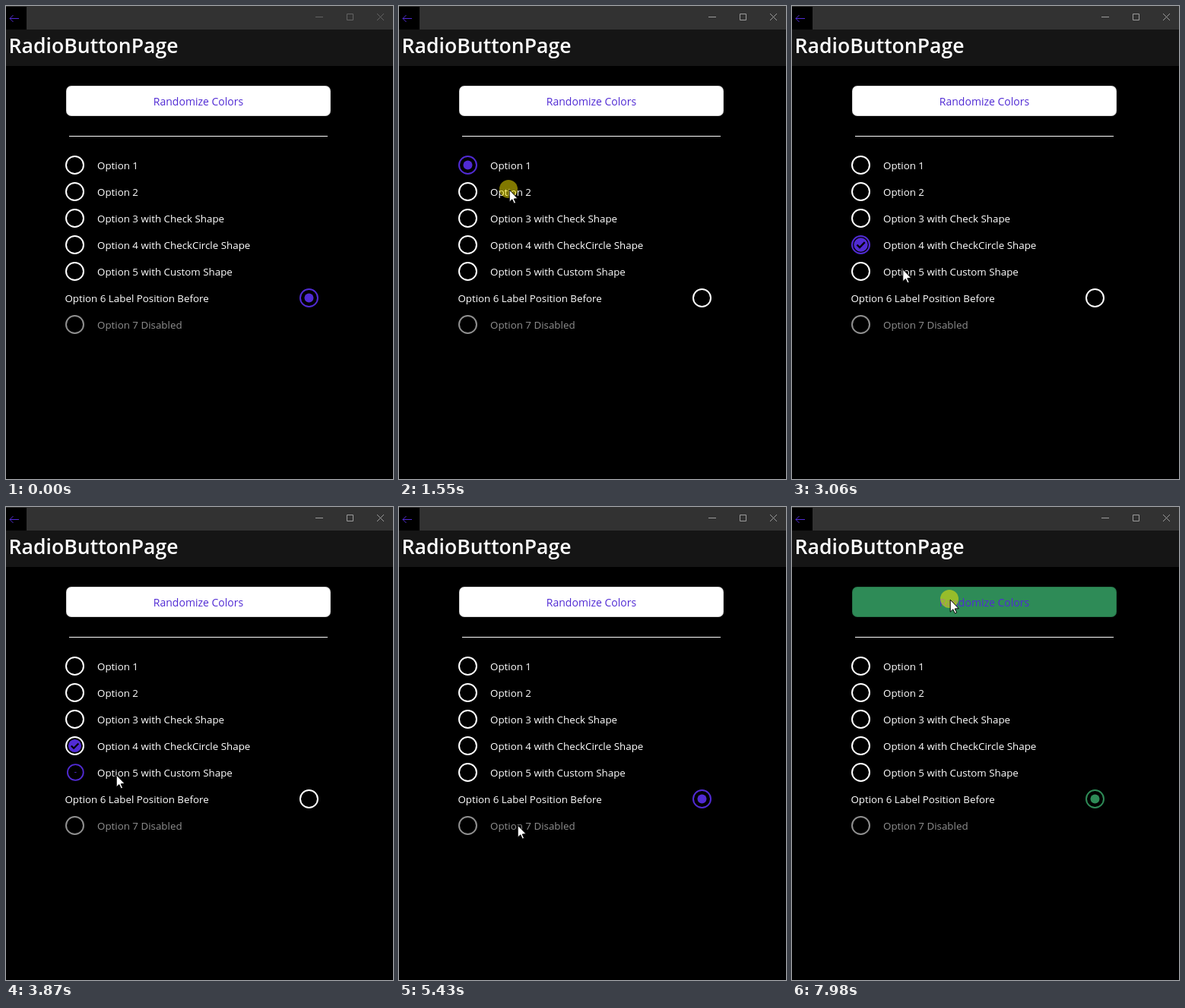
These frames come from a looping animation (509x623 px, 8000 ms). An HTML page with a canvas:

```html
<!DOCTYPE html>
<html lang="en">
<head>
<meta charset="utf-8">
<title>RadioButtonPage</title>
<style>
  html, body { margin: 0; height: 100%; overflow: hidden; background: #000; }
  canvas { display: block; }
</style>
</head>
<body>
<canvas id="stage" width="509" height="623"></canvas>
<script>
const ctx = document.getElementById('stage').getContext('2d');
const LOOP = 8000, HOLD = 100, SETTLE = 50, GROW = 160;
const SANS = '"Open Sans", "Noto Sans", sans-serif';
const PURPLE = '#512bd4', GREEN = '#2e8b57', WHITE = '#fff';

const labels = [
  'Option 1', 'Option 2', 'Option 3 with Check Shape',
  'Option 4 with CheckCircle Shape', 'Option 5 with Custom Shape',
  'Option 6 Label Position Before', 'Option 7 Disabled'
];
const BEFORE = 5, DISABLED = 6, BUTTON = 7;

// Pointer visits, one per option, then the button twice
const entry = { x: 433, y: 571 };
const stops = [
  { arrive: 600, press: 940, x: 144, y: 209 },
  { arrive: 1400, press: 1540, x: 144, y: 241 },
  { arrive: 2060, press: 2080, x: 145, y: 275 },
  { arrive: 2450, press: 2580, x: 149, y: 312 },
  { arrive: 3130, press: 3690, x: 144, y: 350 },
  { arrive: 4150, press: 4610, x: 144, y: 384 },
  { arrive: 5290, press: 5500, x: 155, y: 418 },
  { arrive: 6780, press: 7235, x: 207, y: 121 },
  { arrive: 7300, press: 7975, x: 207, y: 121 }
];

const ramp = (t, start, length) => Math.min(1, Math.max(0, (t - start) / length));
const ease = u => u * u * (3 - 2 * u);
const actsAt = i => stops[i].press + HOLD + SETTLE;

function pointerAt(t) {
  let { x, y } = entry, from = entry;
  for (const to of stops) {
    const travel = 300 + 0.7 * Math.hypot(to.x - from.x, to.y - from.y);
    const u = ease(ramp(t, to.arrive - travel, travel));
    x += (to.x - x) * u;
    y += (to.y - y) * u;
    from = to;
  }
  return [x, y];
}

function box(x, y, w, h, color) {
  ctx.fillStyle = color;
  ctx.fillRect(x, y, w, h);
}

function text(str, x, y, font, color, align = 'left') {
  ctx.font = `${font} ${SANS}`;
  ctx.textAlign = align;
  ctx.fillStyle = color;
  ctx.fillText(str, x, y);
}

function stroke(shape, color, width = 1) {
  ctx.strokeStyle = color;
  ctx.lineWidth = width;
  ctx.stroke(new Path2D(shape));
}

function disc(x, y, r, color) {
  ctx.beginPath();
  ctx.arc(x, y, r, 0, 7);
  ctx.fillStyle = color;
  ctx.fill();
}

function mark(i, color) {
  if (i === 2) stroke('M-5.7 0 L-1.9 4.2 L6.3 -4.6', color, 2.8);
  else if (i === 3) {
    disc(0, 0, 9.2, color);
    stroke('M-5 0 L-1.5 3.5 L5.2 -3.3', '#000', 2.4);
  } else if (i === 4) box(-7, -2.5, 14, 5, color);
  else disc(0, 0, 6, color);
}

// How far mark i has grown: in after its own click, out after the next one
function markLevel(i, t) {
  if (i === DISABLED) return 0;
  const shown = ramp(t, actsAt(i), GROW);
  if (i === BEFORE) return shown + 1 - ramp(t, actsAt(0) + 20, GROW);
  return shown - ramp(t, actsAt(i + 1) + 20, GROW);
}

function isSelected(i, t) {
  if (i === DISABLED) return false;
  if (i === BEFORE) return t < actsAt(0) || t >= actsAt(i);
  return t >= actsAt(i) && t < actsAt(i + 1);
}

function radio(i, t, accent) {
  const y = 209.5 + 35 * i, before = i === BEFORE;
  const { press } = stops[i];
  const size = 1 - 0.5 * (ramp(t, press + 15, HOLD - 15) - ramp(t, press + HOLD, 100));
  const level = markLevel(i, t);

  ctx.save();
  if (i === DISABLED) ctx.globalAlpha = 0.56;
  text(labels[i], before ? 77.4 : 120, y + 5.5, '13.35px', WHITE);
  // A pressed icon shrinks towards its label side
  ctx.translate((before ? 398.5 : 90.5) + 9 * (1 - size), y);
  ctx.scale(size, size);
  ctx.beginPath();
  ctx.arc(0, 0, 11.5, 0, 7);
  ctx.lineWidth = 2;
  ctx.strokeStyle = isSelected(i, t) ? accent : WHITE;
  ctx.stroke();
  if (level > 0) {
    ctx.scale(level, level);
    mark(i, accent);
  }
  ctx.restore();
}

function windowFrame(focused) {
  box(0, 0, 509, 623, '#000');
  box(0, 0, 509, 31, '#323232');
  box(0, 31, 509, 48, '#151515');
  box(0, 1, 27, 30, '#000');
  stroke('M17 16.5 H5 M9.5 12 L5 16.5 L9.5 21', PURPLE);
  stroke('M407 14.5 h10 M448.5 10.5 h8 v8 h-8 z M488 10 l9 9 m0 -9 l-9 9',
    focused ? '#9c9c9c' : '#636363');
  text('RadioButtonPage', 3.6, 61.7, '600 26.6px', WHITE);
}

function pointer(t) {
  const [x, y] = pointerAt(t);
  if (stops.some(({ press }) => t >= press && t < press + HOLD))
    disc(x, y, 12, 'rgba(255, 240, 0, 0.5)');
  ctx.save();
  ctx.translate(x + 1.2, y + 1.2);
  const arrow = 'M0 0 V16 L3.6 12.6 L6.2 18 L8.4 17 L6 11.8 L11 11.5 Z';
  ctx.fillStyle = WHITE;
  ctx.fill(new Path2D(arrow));
  stroke(arrow, '#000');
  ctx.restore();
}

function draw(t) {
  const accent = t >= actsAt(BUTTON) ? GREEN : PURPLE;
  windowFrame(t >= stops[0].press);
  ctx.beginPath();
  ctx.roundRect(79, 105, 348, 40, 7);
  ctx.fillStyle = accent === GREEN ? GREEN : WHITE;
  ctx.fill();
  ctx.beginPath();
  ctx.roundRect(79.5, 105.5, 347, 39, 6.5);
  ctx.lineWidth = 1;
  ctx.strokeStyle = 'rgba(0, 0, 0, 0.15)';
  ctx.stroke();
  text('Randomize Colors', 253, 131, '14px', PURPLE, 'center');
  box(83, 171, 340, 1, WHITE);
  labels.forEach((_, i) => radio(i, t, accent));
  if (t >= 65) pointer(t);
}

const start = performance.now();
function tick() {
  draw((performance.now() - start) % LOOP);
  requestAnimationFrame(tick);
}
tick();
</script>
</body>
</html>
```
